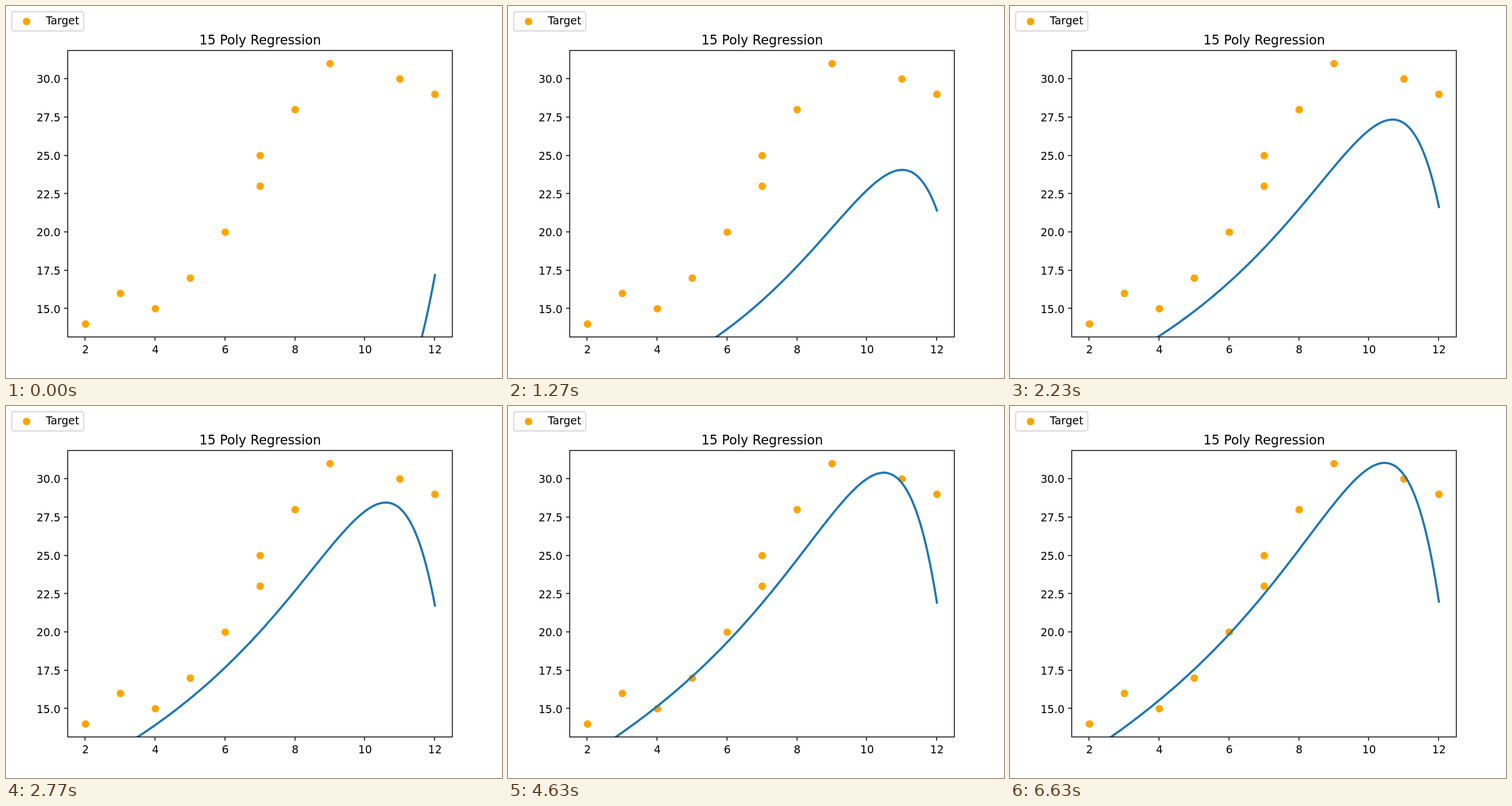
Recreate the animation shown at these times as an HTML page. Size 864x648 px, loop 6660 ms.

```html
<!DOCTYPE html>
<html lang="en">
<head>
<meta charset="utf-8">
<title>15 Poly Regression</title>
<style>
html, body { margin: 0; width: 100%; height: 100%; overflow: hidden; background: #fff; }
svg { display: block; width: 864px; height: 648px; }
text { font: 18.75px "DejaVu Sans", sans-serif; }
.title { font-size: 22.5px; }
.dots { fill: #ffa500; }
.axes { fill: none; stroke: #000; stroke-width: 1.5; }
.fit { fill: none; stroke: #1f77b4; stroke-width: 3.75; stroke-linecap: square; stroke-linejoin: round; }
</style>
</head>
<body>
<svg viewBox="0 0 864 648">
  <clipPath id="plot"><rect x="108" y="77.76" width="669.6" height="498.96"/></clipPath>
  <g class="dots" id="dots"><circle cx="35.8" cy="27" r="6.56"/></g>
  <g clip-path="url(#plot)"><path class="fit" id="fit"/></g>
  <path class="axes" id="axes"/>
  <g id="labels"></g>
  <text class="title" x="442.8" y="67" text-anchor="middle">15 Poly Regression</text>
  <rect x="10" y="10" width="125.5" height="33.5" rx="3.75" fill="none" stroke="#d6d6d6" stroke-width="1.875"/>
  <text x="69.5" y="32">Target</text>
</svg>
<script>
const LOOP = 6660;
const $ = id => document.getElementById(id);
const px = x => 108 + (x - 1.5) * 60.873;
const py = y => 576.72 - (y - 13.15) * 26.682;
const snap = v => Math.round(v) - 0.5;

const data = [[2, 14], [3, 16], [4, 15], [5, 17], [6, 20], [7, 23], [7, 25], [8, 28], [9, 31], [11, 30], [12, 29]];
for (const [x, y] of data)
  $('dots').innerHTML += `<circle cx="${px(x)}" cy="${py(y)}" r="6.56"/>`;

// Frame, ticks and tick labels
let axes = 'M107.5 77.5H777.5V576.5H107.5Z';
let labels = '';
for (let x = 2; x <= 12; x += 2) {
  axes += `M${snap(px(x))} 576.5v6.5`;
  labels += `<text x="${px(x)}" y="605" text-anchor="middle">${x}</text>`;
}
for (let y = 15; y <= 30; y += 2.5) {
  axes += `M107.5 ${snap(py(y))}h-6.5`;
  labels += `<text x="94.9" y="${Math.round(py(y) + 7.35)}" text-anchor="end">${y.toFixed(1)}</text>`;
}
$('axes').setAttribute('d', axes);
$('labels').innerHTML = labels;

// Each error mode of the descent shrinks by its own factor per step;
// the fastest one overshoots, so its sign alternates.
function fit(x, step) {
  const z = x - 7, r = x / 12;
  const final = 22.77 + 2.858 * z + 0.1954 * z ** 2 + 0.0085 * z ** 3 - 21 * r ** 12;
  const slow = 15 + 1.7 * z - 22 * r ** 11;
  const quick = 8.2 + 0.5 * z - 12.5 * r ** 16;
  const fastest = 5.1 * r ** 15;
  return final - slow * 0.9795 ** step - quick * 0.923 ** step - fastest * (-0.26) ** step;
}

function draw() {
  const t = performance.now() % LOOP;
  // 30 steps a second, on a 10 ms grid
  const step = Math.min(199, Math.floor((Math.floor(t / 10) + 0.34) * 0.3));
  const points = [];
  for (let i = 0; i <= 200; i++) {
    const x = 2 + i / 20;
    points.push(px(x).toFixed(2) + ' ' + py(fit(x, step)).toFixed(2));
  }
  $('fit').setAttribute('d', 'M' + points.join('L'));
  requestAnimationFrame(draw);
}
draw();
</script>
</body>
</html>
```
